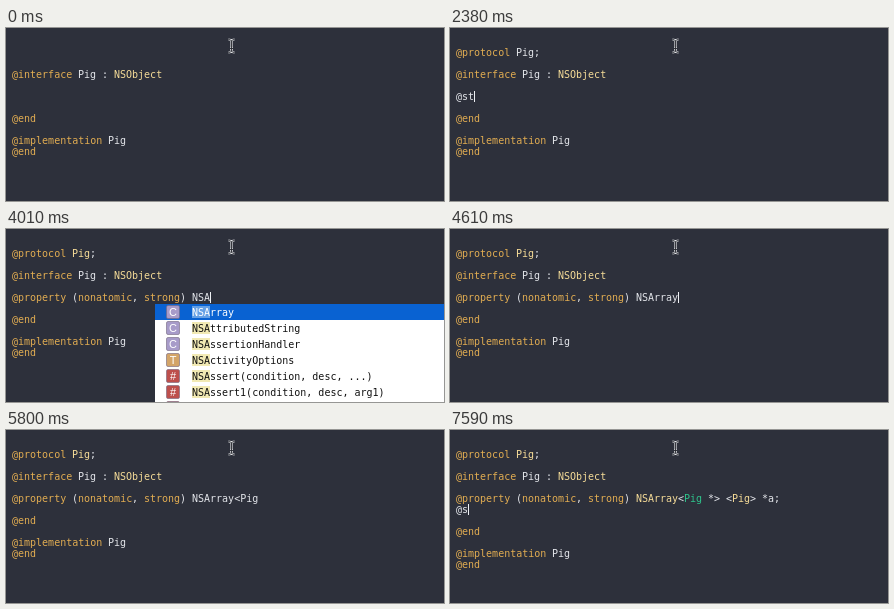
Animation, 438 px wide and 173 px high, one loop 8 s. Source, as an HTML page:

```html
<!DOCTYPE html>
<html lang="en">
<head>
<meta charset="utf-8">
<title>Code completion</title>
<style>
  html, body { margin: 0; width: 100%; height: 100%; overflow: hidden; background: #2d303b; }
  svg { display: block; width: 438px; height: 173px; }
  text { font: 10px "DejaVu Sans Mono", monospace; white-space: pre; }
  .icon { font: 11px "Liberation Sans", sans-serif; text-anchor: middle; }
</style>
</head>
<body>
<svg id="stage" viewBox="0 0 438 173">
  <rect width="438" height="173" fill="#2d303b"/>
  <g id="editor"></g>
  <g id="popup"></g>
  <g fill="none">
    <path d="M222.5 11.5Q225 11.5 225.5 13Q226 11.5 228.5 11.5M225.5 13V23M222.5 24.5Q225 24.5 225.5 23Q226 24.5 228.5 24.5M224 20.5H227" stroke="#e4e5e8" stroke-width="2.2"/>
    <path d="M222.5 11.5Q225 11.5 225.5 13Q226 11.5 228.5 11.5M225.5 13V23M222.5 24.5Q225 24.5 225.5 23Q226 24.5 228.5 24.5M224 20.5H227" stroke="#24262d" stroke-width="0.9"/>
  </g>
</svg>
<script>
const LOOP = 8000, LEFT = 6, TOP = 19, CHAR = 6, LINE = 11, ROW = 16;
const COLORS = { k: '#e2ad52', p: '#e3e5ea', y: '#f6dc98', g: '#2fc38c' };
const ICONS = { C: '#a79bc9', T: '#d3a468', '#': '#bd4f4c' };

const colX = col => LEFT + col * CHAR;
const lineY = line => TOP + line * LINE;
const escapeText = s => s.replace(/&/g, '&amp;').replace(/</g, '&lt;');
const label = (x, y, s, fill, cls = '') =>
  `<text x="${x}" y="${y}" fill="${fill}" class="${cls}">${escapeText(s)}</text>`;
const box = (x, y, w, h, fill, extra = '') =>
  `<rect x="${x}" y="${y}" width="${w}" height="${h}" fill="${fill}" ${extra}/>`;

// Each "|"-separated run begins with its colour key.
function codeLine(markup, line) {
  let col = 0;
  return markup.split('|').filter(Boolean).map(run => {
    const s = run.slice(1), x = colX(col);
    col += s.length;
    return label(x, lineY(line) + 9, s, COLORS[run[0]]);
  }).join('');
}

// Completion entries: icon, then the name with matched parts in [brackets].
const nsItems = m => ['Array', 'AttributedString', 'AssertionHandler', 'ActivityOptions',
  'Assert(condition, desc, ...)', 'Assert1(condition, desc, arg1)', 'Assert2(condition, desc, arg1, arg2)']
  .map((s, i) => 'CCCT###'[i] + `[${m}]` + ('NSA' + s.slice(1)).slice(m.length));
const PI_ITEMS = ['C[Pi]g', 'T[pi]d_t', 'CNS[P]rocess[I]nfo', 'CUI[P]rint[I]nfo',
  'TCF[P]lug[I]nRef', 'TCV[Pi]xelBufferRef', 'TCF[P]lug[I]nInstanceRef'];
const PIG_ITEMS = ['C[Pig]', 'TCG[P]athDraw[i]n[g]Mode', 'CUI[Pi]nch[G]estureRecognizer',
  'CUILong[P]ressGestureRecogn[i]zer'];

function popupView({ col, items, alpha = 1 }) {
  const textX = colX(col), x = textX - 37, y = TOP + 56;
  let out = box(x, y, 438 - x, items.length * ROW, '#fff');
  items.forEach((item, i) => {
    const top = y + i * ROW, selected = i === 0;
    if (selected) out += box(x, top, 438 - x, ROW, '#0962d2');
    out += box(x + 11.5, top + 1.5, 13, 13, ICONS[item[0]], 'rx="1.5" stroke="#74677f" stroke-opacity=".6"');
    out += label(x + 18, top + 12, item[0], '#fff', 'icon');
    let at = 0;
    item.slice(1).split(/[\[\]]/).forEach((part, n) => {
      const px = textX + at * CHAR;
      if (n % 2) out += box(px, top + 2, part.length * CHAR, 12, selected ? '#65a0e5' : '#f2eab4');
      out += label(px, top + 12, part, selected ? '#fff' : '#111');
      at += part.length;
    });
  });
  return `<g opacity="${alpha}">${out}</g>`;
}

const PROPERTY = 'k@property|p (|knonatomic|p, |kstrong|p) |';
const PROTOCOL = 'k@protocol|';
const typed = s => PROPERTY + 'p' + s;
const caretAt = s => [30 + s.length, 4];
const write = (s, popup = null) => ({ property: typed(s), caret: caretAt(s), token: false, popup });
const shortcut = s => ({ property: 'p' + s, caret: [s.length, 4] });

const steps = [
  [0, { protocol: '', property: '', extra: '', base: 'yNSObject', caret: null, token: false, popup: null, shift: 0 }],
  [150, { caret: [0, 0] }],
  [750, { caret: null }],
  [1040, { protocol: 'p@', caret: [1, 0] }],
  [1340, { protocol: PROTOCOL + 'p P', caret: [11, 0] }],
  [1490, { protocol: PROTOCOL + 'p Pig;', caret: [14, 0] }],
  [1940, { caret: [0, 4] }],
  [2090, shortcut('@')],
  [2230, shortcut('@s')],
  [2380, shortcut('@st')],
  [2820, { ...shortcut('@str'), protocol: PROTOCOL + 'p |yPig|p;' }],
  [2970, shortcut('@stron')],
  [3120, shortcut('@strong')],
  [3270, { property: PROPERTY, caret: null, token: true }],
  [3720, write('N')],
  [3870, write('NS', { col: 30, items: nsItems('NS'), alpha: 0.7 })],
  [4010, write('NSA', { col: 30, items: nsItems('NSA') })],
  [4610, write('NSArray')],
  [5210, write('NSArray<')],
  [5360, write('NSArray<p')],
  [5500, write('NSArray<pi', { col: 38, items: PI_ITEMS, alpha: 0.7 })],
  [5650, write('NSArray<pi', { col: 38, items: PI_ITEMS })],
  [5800, { ...write('NSArray<Pig'), caret: null }],
  [6100, write('NSArray<Pig *')],
  [6250, write('NSArray<Pig *>')],
  [6400, write('NSArray<Pig *> <')],
  [6550, write('NSArray<Pig *> <pig', { col: 46, items: PIG_ITEMS })],
  [6690, write('NSArray<Pig *> <Pig>')],
  [6840, write('NSArray<Pig *> <Pig> *a;')],
  [6990, { caret: [0, 5], shift: 1, base: 'pNSObject' }],
  [7290, { property: PROPERTY + 'yNSArray|p<|gPig|p *> <|yPig|p> *a;',
           extra: 'p@', caret: [1, 5], base: 'yNSObject' }],
  [7590, { extra: 'p@s', caret: [2, 5] }],
];

const editor = document.getElementById('editor');
const popupLayer = document.getElementById('popup');
let shown = -1;

function render(time) {
  const t = time % LOOP;
  const count = steps.filter(([start]) => start <= t).length;
  if (count === shown) return;
  shown = count;
  const s = Object.assign({}, ...steps.slice(0, count).map(step => step[1]));
  let out = codeLine(s.protocol, 0)
    + codeLine('k@interface|p Pig : |' + s.base, 2)
    + codeLine(s.property, 4)
    + codeLine(s.extra, 5)
    + codeLine('k@end', 6 + s.shift)
    + codeLine('k@implementation|p Pig', 8 + s.shift)
    + codeLine('k@end', 9 + s.shift);
  if (s.token) {
    out += box(187, 64, 44, 10, '#5189c1', 'rx="2"') + label(191, 72, 'custom', '#17202b');
  }
  if (s.caret) out += box(colX(s.caret[0]), lineY(s.caret[1]), 1, LINE, '#eef0f4');
  editor.innerHTML = out;
  popupLayer.innerHTML = s.popup ? popupView(s.popup) : '';
}

const origin = performance.now();
function tick() {
  render(performance.now() - origin);
  requestAnimationFrame(tick);
}
tick();
</script>
</body>
</html>
```
